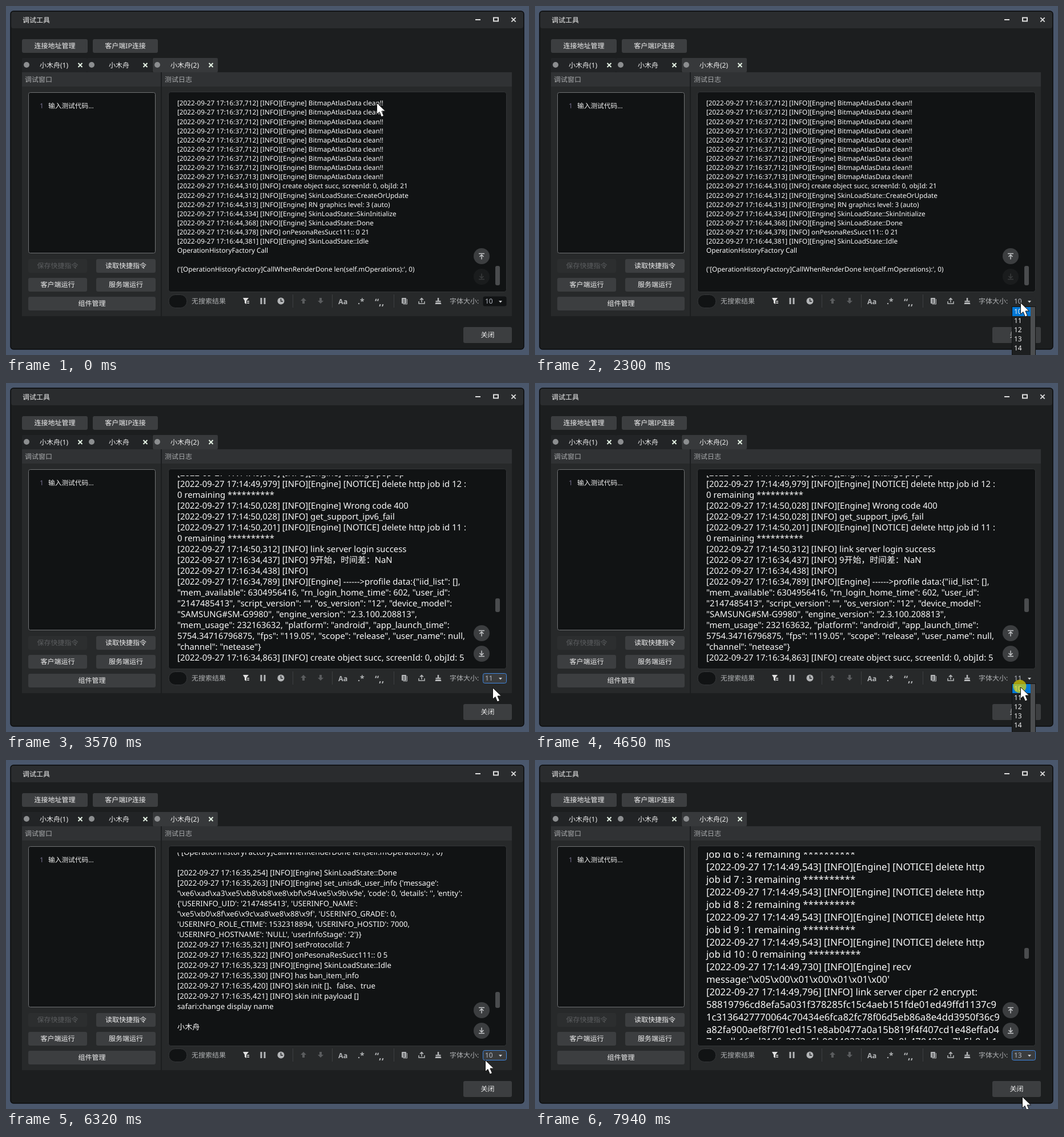
Animation of 916x611 px, one loop 8 s. Source, as an HTML page:

```html
<!DOCTYPE html>
<html lang="zh-CN">
<head>
<meta charset="utf-8">
<title>调试工具</title>
<style>
  html, body { margin: 0; width: 100%; height: 100%; overflow: hidden; background: #4a576c; }
  svg { display: block; }
  text { font-family: "Noto Sans", "Noto Sans CJK SC", sans-serif; text-rendering: geometricPrecision; white-space: pre; }
</style>
</head>
<body>
<svg id="stage" width="916" height="611" viewBox="0 0 916 611"></svg>
<script>
const LOOP = 8000, ITEM = 16, LIST_TOP = 527;
const DARK = '#111314', BUTTON = '#3c3e40', ICON = '#b4b6b8';
const USER = '小木舟';

const escapeText = s => s.replace(/&/g, '&amp;').replace(/</g, '&lt;');
const rect = (x, y, w, h, fill, r = 0, extra = '') =>
  `<rect x="${x}" y="${y}" width="${w}" height="${h}" rx="${r}" fill="${fill}" ${extra}/>`;
const path = (d, stroke, width = 1.5, fill = 'none') =>
  `<path d="${d}" stroke="${stroke}" stroke-width="${width}" fill="${fill}"/>`;
const circle = (x, y, r, fill, extra = '') => `<circle cx="${x}" cy="${y}" r="${r}" fill="${fill}" ${extra}/>`;
// cy is the visual centre of the line
const text = (x, cy, s, size = 12, fill = '#f0f0f0', extra = '') =>
  `<text x="${x}" y="${cy + size * .36}" font-size="${size}" fill="${fill}" ${extra}>${escapeText(s)}</text>`;
const button = (x, y, w, h, label, fill = BUTTON, color) =>
  rect(x, y, w, h, fill, 3) + text(x + w / 2, y + h / 2, label, 12, color, 'text-anchor="middle"');
const cross = (x, y, r, width, color = '#fff') =>
  path(`M${x - r} ${y - r}l${2 * r} ${2 * r}m0 ${-2 * r}l${-2 * r} ${2 * r}`, color, width);

// Log pages
const stamp = (time, s, tag = '[INFO][Engine]') => `[2022-09-27 17:${time}] ${tag} ${s}`;
const info = (time, s) => stamp(time, s, '[INFO]');
const callDone = "('[OperationHistoryFactory]CallWhenRenderDone len(self.mOperations):', 0)";
const job = (id, left) => [stamp('14:49,543', '[NOTICE] delete http'), `job id ${id} : ${left} remaining **********`];

const pages = [
  { size: 11.75, first: 170, pitch: 16.14, thumb: [455, 34], lines: [
    ...Array.from({ length: 9 }, (_, i) => stamp(i < 8 ? '16:37,712' : '16:37,713', 'BitmapAtlasData clean!!')),
    info('16:44,310', 'create object succ, screenId: 0, objId: 21'),
    stamp('16:44,312', 'SkinLoadState::CreateOrUpdate'),
    stamp('16:44,313', 'RN graphics level: 3 (auto)'),
    stamp('16:44,334', 'SkinLoadState::SkinInitialize'),
    stamp('16:44,368', 'SkinLoadState::Done'),
    info('16:44,378', 'onPesonaResSucc111:: 0 21'),
    stamp('16:44,381', 'SkinLoadState::Idle'),
    'OperationHistoryFactory Call', '', callDone] },
  { size: 14.88, first: 157.2, pitch: 19.03, thumb: [377, 24], lines: [
    stamp('14:49,978', 'Change pop up'),
    stamp('14:49,979', '[NOTICE] delete http job id 12 :'),
    '0 remaining **********',
    stamp('14:50,028', 'Wrong code 400'),
    info('14:50,028', 'get_support_ipv6_fail'),
    stamp('14:50,201', '[NOTICE] delete http job id 11 :'),
    '0 remaining **********',
    info('14:50,312', 'link server login success'),
    info('16:34,437', '9开始，时间差：NaN'),
    info('16:34,438', ''),
    stamp('16:34,789', '------>profile data:{"iid_list": [],'),
    '"mem_available": 6304956416, "rn_login_home_time": 602, "user_id":',
    '"2147485413", "script_version": "", "os_version": "12", "device_model":',
    '"SAMSUNG#SM-G9980", "engine_version": "2.3.100.208813",',
    '"mem_usage": 232163632, "platform": "android", "app_launch_time":',
    '5754.34716796875, "fps": "119.05", "scope": "release", "user_name": null,',
    '"channel": "netease"}',
    info('16:34,863', 'create object succ, screenId: 0, objId: 5')] },
  { size: 13.15, first: 161, pitch: 18.04, thumb: [406, 28], lines: [
    callDone, '',
    stamp('16:35,254', 'SkinLoadState::Done'),
    stamp('16:35,263', "set_unisdk_user_info {'message':"),
    "'\\xe6\\xad\\xa3\\xe5\\xb8\\xb8\\xe8\\xbf\\x94\\xe5\\x9b\\x9e', 'code': 0, 'details': '', 'entity':",
    "{'USERINFO_UID': '2147485413', 'USERINFO_NAME':",
    "'\\xe5\\xb0\\x8f\\xe6\\x9c\\xa8\\xe8\\x88\\x9f', 'USERINFO_GRADE': 0,",
    "'USERINFO_ROLE_CTIME': 1532318894, 'USERINFO_HOSTID': 7000,",
    "'USERINFO_HOSTNAME': 'NULL', 'userInfoStage': '2'}}",
    info('16:35,321', 'setProtocolId: 7'),
    info('16:35,322', 'onPesonaResSucc111:: 0 5'),
    stamp('16:35,323', 'SkinLoadState::Idle'),
    info('16:35,330', 'has ban_item_info'),
    info('16:35,420', 'skin init []、false、true'),
    info('16:35,421', 'skin init payload []'),
    'safari:change display name', '', USER] },
  { size: 16.7, first: 165.4, pitch: 21.87, thumb: [329, 19], lines: [
    job(6, 4)[1], ...job(7, 3), ...job(8, 2), ...job(9, 1), ...job(10, 0),
    stamp('14:49,730', 'recv'),
    "message:'\\x05\\x00\\x01\\x00\\x01\\x01\\x00'",
    info('14:49,796', 'link server ciper r2 encrypt:'),
    '58819796cd8efa5a031f378285fc15c4aeb151fde01ed49ffd1137c9',
    '1c3136427770064c70434e6fca82fc78f06d5eb86a8e4dd3950f36c9',
    'a82fa900aef8f7f01ed151e8ab0477a0a15b819f4f407cd1e48effa04',
    '7c0adb16ad218fa20f2a5b0944022206ba2a0b470428ac7b5b0ab1'] },
];
const logPage = ({ size, first, pitch, thumb, lines }) =>
  '<g class="page"><g clip-path="url(#log)">' +
  lines.map((s, i) => text(300, first + i * pitch, s, size, '#fafafa')).join('') +
  '</g>' + rect(857, thumb[0], 8, thumb[1], '#4a4c4e', 3) + '</g>';

const tab = (x, label, fill) =>
  rect(x, 91, 114, 25, fill, 2) + circle(x + 8, 103, 5, '#8c8e90') +
  text(x + 56, 104, label, 12, '#f0f0f0', 'text-anchor="middle"') + cross(x + 102, 103.5, 3.5, 2, '#e4f2e4');

const frame =
  rect(0, 0, 916, 611, '#4a576c') +
  rect(8, 9, 899, 592, '#1c1e1f', 5, 'stroke="#0b0c0d" stroke-width="1.5"') +
  rect(9, 10, 897, 29, '#2a2c2e', 4) +
  text(29, 25, '调试工具') +
  rect(822, 23, 9, 2, '#ddd') + rect(854, 20.5, 8, 6, 'none', 0, 'stroke="#ddd" stroke-width="2"') +
  cross(889, 24, 3.7, 1.8, '#ddd') +
  button(28, 58, 115, 24, '连接地址管理') + button(152, 58, 114, 24, '客户端IP连接') +
  tab(28, USER + '(1)', '#222426') + tab(142, USER, '#222426') + tab(257, USER + '(2)', '#37393b') +
  [[28, 243, '调试窗口'], [273, 613, '测试日志']].map(([x, w, label]) =>
    rect(x, 116, w, 427, '#27292a') + rect(x, 116, w, 25, '#303234') + text(x + 5, 129, label, 12, '#a8aaac')).join('') +
  rect(39.5, 151.5, 222, 281, DARK, 3, 'stroke="#707274"') +
  text(59, 175, '1', 12, '#77728f') + text(74, 175, '输入测试代码...', 11.7) +
  button(39, 443, 103, 24, '保存快捷指令', '#2c2e2f', '#5c5e60') + button(158, 443, 104, 24, '读取快捷指令') +
  button(39, 476, 103, 24, '客户端运行') + button(158, 476, 104, 24, '服务端运行') +
  button(39, 509, 223, 24, '组件管理') +
  rect(284.5, 150.5, 592, 350, DARK, 4, 'stroke="#333537"') +
  button(801, 562, 85, 28, '关闭');

const arrow = (x, dir) => path(`M${x} ${516 - 5 * dir}l5 ${5 * dir}h-3v${5 * dir}h-4v${-5 * dir}h-3z`, 'none', 0, '#5a5c5e');
const toolbar =
  rect(285, 505.5, 32, 23, DARK, 11.5, 'stroke="#353739"') + text(325, 517, '无搜索结果', 12, '#b0b2b4') +
  path('M415 511h10l-4 5v6l-3 -2v-4z', 'none', 0, '#e0e0e0') + path('M422 517h4m-4 3h4', '#e0e0e0') +
  path('M447 511v11m6 -11v11', ICON, 3) +
  circle(481.5, 516.5, 6, ICON) + path('M481.5 512.5v4.5h3.5', '#27292a') +
  [502, 571, 679].map(x => rect(x, 505, 1, 23, '#3d3f41')).join('') +
  arrow(521, 1) + arrow(551, -1) +
  text(582, 517, 'Aa', 12.5, ICON, 'font-weight="700"') +
  text(616, 517, '.*', 14, ICON, 'font-weight="700"') +
  text(646, 518, '“,,', 16, ICON, 'font-weight="700"') +
  rect(693, 511, 8, 10, ICON, 1) + path('M702.5 513v9h-7', ICON, 1) + path('M695 514h4m-4 2.5h4m-4 2.5h4', '#27292a', 1) +
  path('M723 517v4h10v-4M728 519v-7m-3 2.5l3 -3l3 3', ICON) +
  path('M757 511v5', ICON, 2.5) + path('M752.5 516h9v2h-9zm0 3h9l1 3h-11z', 'none', 0, ICON) +
  text(777, 517, '字体大小:', 12, '#b0b2b4');

const scrollButton = (y, dir, id) => `<g id="${id}">` + circle(833, y, 14, BUTTON) +
  path(`M828 ${y - 4.5 * dir}h10M833 ${y + 5.5 * dir}v${-8 * dir}m-3.5 ${3.5 * dir}l3.5 ${-3.5 * dir}l3.5 ${3.5 * dir}`, '#c4c6c8', 1.5) + '</g>';

const select = '<g id="select">' + rect(835.5, 508.5, 41, 17, DARK, 3, 'id="box"') +
  text(839, 517, '10', 12, '#b4b8c2', 'id="value"') + path('M863 516h6l-3 3.5z', 'none', 0, '#d0d2d4') + '</g>';
const list = '<g id="list">' + rect(835, 526, 42, 90, '#101112') + rect(836, 527, 32, 90, '#1d1f20') +
  rect(868, 527, 8, 90, '#4c4e50') + rect(836, LIST_TOP, 32, ITEM, '#0078d7', 0, 'id="active"') +
  [10, 11, 12, 13, 14].map((n, i) => text(839, LIST_TOP + 8 + i * ITEM, n + '', 12)).join('') + '</g>';
const pointer = '<g id="pointer">' + circle(-1, -1, 11.5, '#e6d800', 'id="ring" opacity=".68"') +
  path('M.5 .5V20.5L5 16.5L8.5 25L12.5 23.3L9 15H15.5Z', '#111', 1, '#fff') + '</g>';

stage.innerHTML = '<clipPath id="log"><rect x="296" y="162" width="556" height="328"/></clipPath>' +
  frame + pages.map(logPage).join('') + scrollButton(438, 1, 'toTop') + scrollButton(474, -1, 'toEnd') +
  toolbar + select + list + pointer;

// Pointer moves: first step, last step, step count, goal
const moves = [
  [860, 1630, 12, 850, 512], [2300, 2300, 1, 850, 519], [2370, 2780, 6, 852, 548],
  [3570, 3570, 1, 852, 533], [3640, 3850, 4, 850, 517], [4250, 4390, 3, 850, 532],
  [5570, 5850, 5, 800, 488], [6110, 6320, 4, 839, 525], [6390, 6590, 3, 850, 519],
  [6930, 7140, 3, 853, 588], [7210, 7210, 1, 857, 590], [7340, 7340, 1, 853, 589],
];
const clicks = [[1830, 1970], [2910, 3040], [3910, 4050], [4650, 4780], [6720, 6860], [7670, 7870]];
const opened = [[1900, 3040], [3980, 4780], [6790, 7870]];
const pageStarts = [0, 3040, 4780, 7940];
const valueStarts = [0, 3040, 4780, 7870], values = [10, 11, 10, 13];

const within = (spans, t) => spans.some(([a, b]) => t >= a && t < b);
const latest = (starts, t) => starts.filter(s => s <= t).length - 1;

function pointerAt(t) {
  let x = 649, y = 169;
  for (const [start, end, count, toX, toY] of moves) {
    if (t < start) break;
    const step = count > 1 ? (end - start) / (count - 1) : 1;
    const k = Math.min(count, Math.floor((t - start) / step + 1e-6) + 1) / count;
    const eased = k * k * (3 - 2 * k);
    x += (toX - x) * eased;
    y += (toY - y) * eased;
  }
  return [x, y];
}

const el = id => document.getElementById(id);
const pageEls = document.querySelectorAll('.page');
const show = (node, on) => node.setAttribute('visibility', on ? 'visible' : 'hidden');

function draw(now) {
  const t = now % LOOP;
  const [x, y] = pointerAt(t);
  const open = within(opened, t), page = latest(pageStarts, t), value = values[latest(valueStarts, t)];
  const row = y < LIST_TOP ? value - 10 : Math.floor((y - LIST_TOP) / ITEM);
  const focused = !open && t >= 3040;

  el('pointer').setAttribute('transform', `translate(${x} ${y})`);
  show(el('ring'), within(clicks, t));
  show(el('list'), open);
  el('active').setAttribute('y', LIST_TOP + row * ITEM);
  pageEls.forEach((node, i) => show(node, i === page));
  el('toEnd').setAttribute('opacity', page ? 1 : .22);
  el('value').textContent = value;
  el('box').setAttribute('fill', open ? '#27292a' : focused ? '#3a3c3e' : DARK);
  el('box').setAttribute('stroke', focused ? '#3f87e0' : 'none');
  requestAnimationFrame(draw);
}
draw(performance.now());
</script>
</body>
</html>
```
